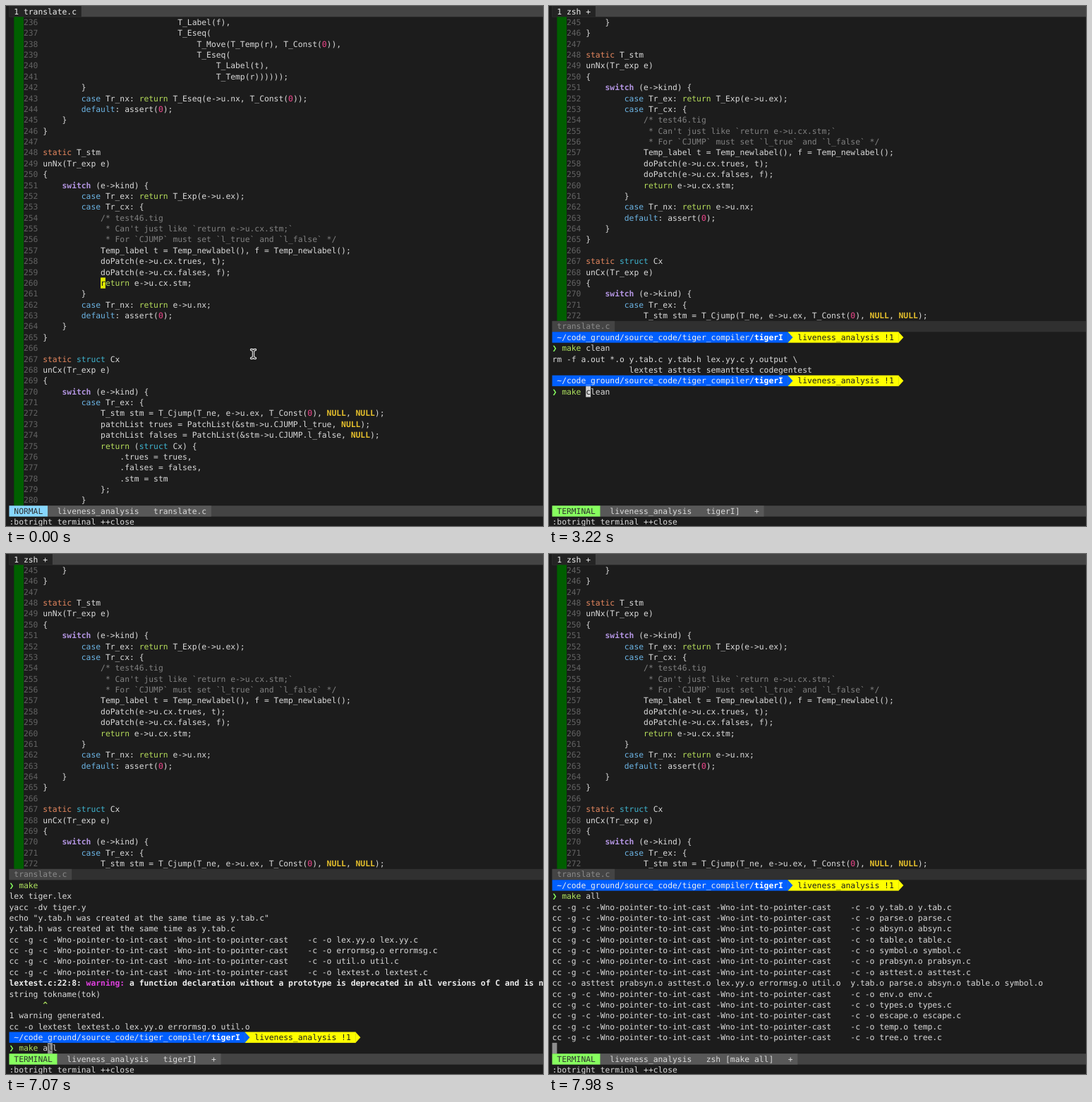
Animation, 761 px wide and 736 px high, one loop 8000 ms. Source, as an HTML page:

```html
<!DOCTYPE html>
<html lang="en">
<head>
<meta charset="utf-8">
<title>Terminal build</title>
<style>
  html, body { margin: 0; width: 100%; height: 100%; overflow: hidden; background: #1c1c1c; }
  svg { display: block; }
  text {
    font: 11.33px "DejaVu Sans Mono", "Liberation Mono", monospace;
    text-rendering: geometricPrecision;
  }
  .bold { font-weight: bold; }
</style>
</head>
<body>
<svg id="screen" width="761" height="736" viewBox="0 0 761 736"></svg>
<script>
const LOOP = 8000, SPLIT_AT = 420, POINTER_HIDES = 140;
const LEFT = 4.5, CELL = 6.82, ROW = 15.375, COLS = 111;
const TERM_TOP = 30, TERM_ROWS = 16, STATUS_ROW = 46;
const FG = "#dadada", BG = "#1c1c1c", GREEN = "#87ff5f", LIME = "#afe35f";

const FIRST_LINE = 236;
const CODE = `                            T_Label(f),
                            T_Eseq(
                                T_Move(T_Temp(r), T_Const(0)),
                                T_Eseq(
                                    T_Label(t),
                                    T_Temp(r))))));
        }
        case Tr_nx: return T_Eseq(e->u.nx, T_Const(0));
        default: assert(0);
    }
}

static T_stm
unNx(Tr_exp e)
{
    switch (e->kind) {
        case Tr_ex: return T_Exp(e->u.ex);
        case Tr_cx: {
            /* test46.tig
             * Can't just like \`return e->u.cx.stm;\`
             * For \`CJUMP\` must set \`l_true\` and \`l_false\` */
            Temp_label t = Temp_newlabel(), f = Temp_newlabel();
            doPatch(e->u.cx.trues, t);
            doPatch(e->u.cx.falses, f);
            return e->u.cx.stm;
        }
        case Tr_nx: return e->u.nx;
        default: assert(0);
    }
}

static struct Cx
unCx(Tr_exp e)
{
    switch (e->kind) {
        case Tr_ex: {
            T_stm stm = T_Cjump(T_ne, e->u.ex, T_Const(0), NULL, NULL);
            patchList trues = PatchList(&stm->u.CJUMP.l_true, NULL);
            patchList falses = PatchList(&stm->u.CJUMP.l_false, NULL);
            return (struct Cx) {
                .trues = trues,
                .falses = falses,
                .stm = stm
            };
        }`.split("\n");

const SYNTAX = {
  static: "#e5875f", struct: "#3fb4cf", switch: "#b294e0", case: "#6cb4e4",
  default: "#6cb4e4", return: "#b5dc5a", 0: "#f0468c", NULL: "#e6c02c"
};
const BOLD_WORDS = ["switch", "NULL"];

// Drawing helpers on the character grid
const colX = col => LEFT + col * CELL;
const escapeText = s => s.replace(/&/g, "&amp;").replace(/</g, "&lt;").replace(/>/g, "&gt;");

function write(row, col, str, color = FG, bold = false) {
  const y = (row * ROW + 11.6).toFixed(2);
  return [...str.matchAll(/\S+/g)].map(m =>
    `<text x="${colX(col + m.index).toFixed(2)}" y="${y}" fill="${color}"` +
    `${bold ? ' class="bold"' : ""}>${escapeText(m[0])}</text>`).join("");
}

function fill(row, col, cols, color, rows = 1) {
  return `<rect x="${colX(col)}" y="${row * ROW}" width="${cols * CELL}" height="${rows * ROW}" fill="${color}"/>`;
}

function arrow(row, col, color) {
  const x = colX(col) - 0.3, y = row * ROW;
  return `<path d="M${x} ${y}l${CELL + 0.3} ${ROW / 2}l${-CELL - 0.3} ${ROW / 2}z" fill="${color}"/>`;
}

const block = (row, col, char, color) => fill(row, col, 1, color) + write(row, col, char, BG);

// Editor
function codeLine(row, str) {
  if (/^ +(\/\*| \*)/.test(str)) return write(row, 7, str, "#808080");
  return [...str.matchAll(/\w+|[^\w\s]+/g)].map(({ 0: word, index }) =>
    write(row, 7 + index, word, SYNTAX[word], BOLD_WORDS.includes(word))).join("");
}

function editor(first, rows) {
  let out = fill(1, 1, 2, "#005f00", rows);
  for (let i = 0; i < rows; i++) {
    const number = first + i;
    out += write(1 + i, 3, String(number), "#626262") + codeLine(1 + i, CODE[number - FIRST_LINE]);
  }
  return out;
}

function tabBar(label) {
  return fill(0, 0, COLS, "#444444") + fill(0, 0, label.length + 2, "#242424") + write(0, 1, label, "#eeeeee");
}

function statusBar(mode, color, label) {
  const modeCols = mode.length + 2;
  const info = `  liveness_analysis   ${label} `;
  return fill(STATUS_ROW, 0, COLS, "#444444") +
    fill(STATUS_ROW, 0, modeCols, color) + write(STATUS_ROW, 1, mode, "#303030") +
    fill(STATUS_ROW, modeCols, info.length, "#585858") + write(STATUS_ROW, modeCols, info, "#d8d8d8") +
    write(STATUS_ROW + 1, 0, ":botright terminal ++close");
}

function pointer() {
  const d = "M347.5 486.5q3 0 3 2.5v7q0 2.5-3 2.5M353.5 486.5q-3 0-3 2.5v7q0 2.5 3 2.5";
  return `<g fill="none" stroke-linecap="round"><path d="${d}" stroke="#eee" stroke-width="3.4"/>` +
    `<path d="${d}" stroke="#222" stroke-width="1.2"/></g>`;
}

// Terminal session
const PROMPT = Symbol("prompt");
const WARNING = "lextest.c:22:8: warning: a function declaration without a prototype is deprecated in all versions of C and is n";
const compile = name =>
  `cc -g -c -Wno-pointer-to-int-cast -Wno-int-to-pointer-cast    -c -o ${name}.o ${name}.c`;

const ask = s => { s.lines.push(PROMPT); s.input = { typed: "", hint: "" }; s.title = "tigerI]"; };
const type = (typed, hint = "") => s => { s.input = { typed, hint }; };
const print = (...lines) => s => { s.lines.push(...lines); };
const build = (...names) => print(...names.map(compile));
const enter = (title, ...lines) => s => {
  s.lines.push({ typed: s.input.typed, hint: "" }, ...lines);
  s.input = null;
  if (title) s.title = title;
};

const SESSION = [
  [630, ask],
  [840, type("m", "ake all")],
  [910, type("ma", "ke all")],
  [980, type("mak", "e all")],
  [1050, type("make", " all")],
  [1190, type("make ", "all")],
  [1470, type("make c", "lean")],
  [1610, type("make cl", "ean")],
  [1750, type("make cle", "an")],
  [1820, type("make clea", "n")],
  [1960, type("make clean")],
  [2310, enter()],
  [2380, print("rm -f a.out *.o y.tab.c y.tab.h lex.yy.c y.output \\",
    " ".repeat(16) + "lextest asttest semanttest codegentest")],
  [2450, ask],
  [2800, type("m", "ake clean")],
  [2940, type("ma", "ke clean")],
  [3010, type("mak", "e clean")],
  [3080, type("make", " clean")],
  [3220, type("make ", "clean")],
  [4340, enter("zsh [make]", "lex tiger.lex")],
  [4410, print("yacc -dv tiger.y")],
  [4550, print('echo "y.tab.h was created at the same time as y.tab.c"',
    "y.tab.h was created at the same time as y.tab.c", compile("lex.yy"), compile("errormsg"))],
  [4620, build("util", "lextest")],
  [4690, print(WARNING, "string tokname(tok)", "       ^", "1 warning generated.")],
  [4760, print("cc -o lextest lextest.o lex.yy.o errormsg.o util.o")],
  [4830, ask],
  [5110, type("m", "ake")],
  [5180, type("ma", "ke")],
  [5320, type("maek")],
  [5880, type("mae")],
  [6020, type("ma", "ke")],
  [6230, type("mak", "e")],
  [6300, type("make")],
  [6370, type("make ")],
  [7070, type("make a", "ll")],
  [7210, type("make al", "l")],
  [7350, type("make all")],
  [7560, enter("zsh [make all]", compile("y.tab"))],
  [7630, build("parse")],
  [7700, build("absyn", "table")],
  [7770, build("symbol", "prabsyn")],
  [7840, build("asttest")],
  [7840, print("cc -o asttest prabsyn.o asttest.o lex.yy.o errormsg.o util.o  y.tab.o parse.o absyn.o table.o symbol.o")],
  [7910, build("env", "types")],
  [7980, build("escape", "temp", "tree")]
];

function promptLine(row) {
  const path = "~/code_ground/source_code/tiger_compiler/";
  return fill(row, 0, 49, "#005fff") + fill(row, 49, 23, "#ffff00") +
    arrow(row, 49, "#005fff") + arrow(row, 72, "#ffff00") +
    write(row, 1, path, "#eeeeee") + write(row, 1 + path.length, "tigerI", "#ffffff", true) +
    write(row, 51, "liveness_analysis !1", "#1c1c1c");
}

function inputLine(row, { typed, hint }) {
  const command = typed.split(" ")[0], known = command === "make";
  return write(row, 0, "❯", GREEN) +
    write(row, 2, command, known ? LIME : "#ff8f9f", !known) +
    write(row, 2 + command.length, typed.slice(command.length) + hint);
}

function terminalLine(row, line) {
  if (line === PROMPT) return promptLine(row);
  if (typeof line === "object") return inputLine(row, line);
  if (line === WARNING)
    return write(row, 0, line.slice(0, 16), "#eeeeee", true) +
      write(row, 16, "warning:", "#e040e0", true) + write(row, 25, line.slice(25), "#eeeeee", true);
  return line.trim() === "^" ? write(row, 0, line, LIME, true) : write(row, 0, line);
}

function terminal({ lines, input }) {
  const visible = [...lines, input || ""].slice(-TERM_ROWS);
  const row = TERM_TOP + visible.length - 1;
  const col = input ? 2 + input.typed.length : 0;
  const color = row === STATUS_ROW - 1 ? "#8e8e8e" : "#d4d4d4";
  return visible.map((line, i) => terminalLine(TERM_TOP + i, line)).join("") +
    block(row, col, input ? input.hint.charAt(0) : "", color);
}

// Views
function fullView(showPointer) {
  return tabBar("1 translate.c") + editor(236, 45) + block(25, 19, "r", "#dfe800") +
    statusBar("NORMAL", "#87d7ff", "translate.c") + (showPointer ? pointer() : "");
}

function splitView(t) {
  const state = { lines: [], input: null, title: "zsh" };
  for (const [time, apply] of SESSION) if (time <= t) apply(state);
  return tabBar("1 zsh +") + editor(245, 28) +
    fill(29, 0, COLS, "#303030") + fill(29, 0, 13, "#444444") + write(29, 1, "translate.c", "#8a8a8a") +
    terminal(state) + statusBar("TERMINAL", GREEN, state.title + "   +");
}

const screen = document.getElementById("screen");
const changes = [POINTER_HIDES, SPLIT_AT, ...SESSION.map(([time]) => time)];
let shown = -1;

function draw(t) {
  const step = changes.filter(time => time <= t).length;
  if (step === shown) return;
  shown = step;
  screen.innerHTML = `<rect width="761" height="736" fill="${BG}"/>` +
    (t < SPLIT_AT ? fullView(t < POINTER_HIDES) : splitView(t));
}

const start = performance.now();
function tick() {
  draw((performance.now() - start) % LOOP);
  requestAnimationFrame(tick);
}
tick();
</script>
</body>
</html>
```
